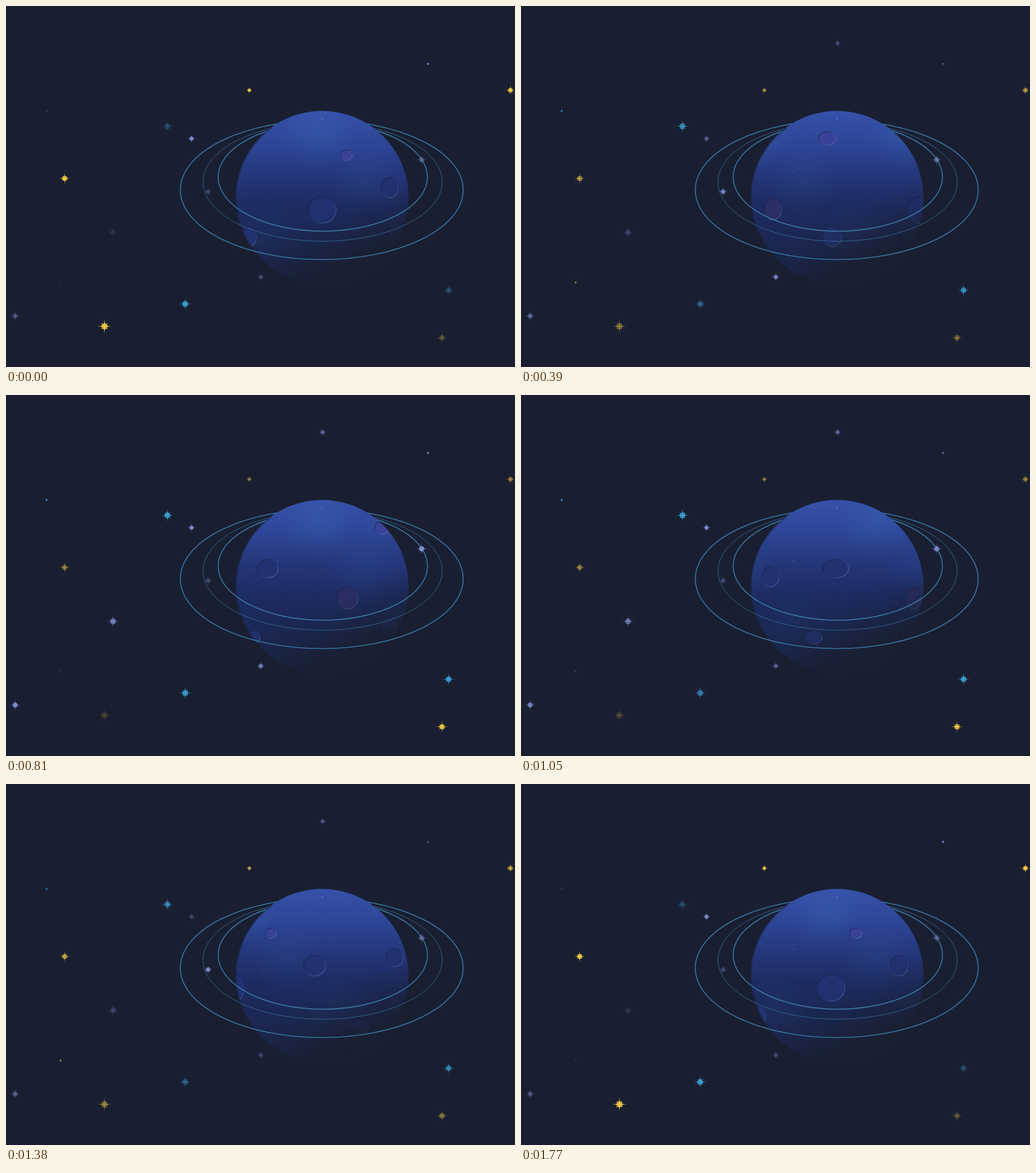
Write an HTML page with a canvas that moves like this. It is 889x630 px and loops after 1.8 s.

```html
<!DOCTYPE html>
<html lang="en">
<head>
<meta charset="utf-8">
<title>Ringed planet</title>
<style>
html, body { margin: 0; width: 100%; height: 100%; overflow: hidden; background: #191f31; }
canvas { display: block; }
</style>
</head>
<body>
<canvas id="stage" width="889" height="630"></canvas>
<script>
const c = document.getElementById('stage').getContext('2d');
const LOOP = 1800, STEP = 30, TAU = Math.PI * 2;
const SKY = '#191f31';
const planet = { x: 552, y: 334, r: 151 };
const YELLOW = '#f6ce44', BLUE = '#3eaae2', VIOLET = '#8493d6';
const NAVY = '#213171', PURPLE = '#3a4297', PLUM = '#2a2e65';

// A pulse rests at one brightness and swings to another around its peak time
const pulse = (peak, rest, top, count = 1) => t => {
  const swing = (1 + Math.cos(TAU * count * (t - peak) / LOOP)) / 2;
  return rest + (top - rest) * swing ** 2;
};
const warm = pulse(1745, .44, .96);
const cool = pulse(1755, .86, .23);
const swell = pulse(840, .38, .97);
const flip = pulse(860, .38, .84, 2);

const stars = [
  [553, 65, 8, VIOLET, pulse(20, .5, 0)],
  [737, 101, 4, VIOLET, flip],
  [425, 147, 6.5, YELLOW, warm],
  [881, 147, 9, YELLOW, warm],
  [71, 183, 3.5, BLUE, cool],
  [282, 210, 11.5, BLUE, cool],
  [324, 231.5, 8, VIOLET, pulse(510, .92, .25, 2)],
  [726, 268.5, 10, VIOLET, swell],
  [102.5, 301, 10, YELLOW, warm],
  [353, 324, 9, VIOLET, pulse(480, .27, .9, 2)],
  [187, 395, 11, VIOLET, pulse(890, .12, .77)],
  [445, 473, 8.5, VIOLET, pulse(610, .25, .9)],
  [95.5, 482.5, 3, YELLOW, pulse(430, .12, .7, 2)],
  [773, 496, 11, BLUE, cool],
  [313, 520, 11.5, BLUE, flip],
  [16, 541, 9.5, VIOLET, swell],
  [172, 559, 12.5, YELLOW, pulse(1770, .14, .92)],
  [761.5, 579, 10.5, YELLOW, pulse(910, .23, .95)]
];

// mid: time at the middle of the planet; speed in pixels per ms
const craters = [
  { mid: 1665, speed: .313, y: 260.5, w: 22, h: 18, fill: PURPLE },
  { mid: 1422, speed: .312, y: 317, w: 39, h: 36, fill: NAVY },
  { mid: 1798, speed: .36, y: 356, w: 48, h: 46, fill: NAVY },
  { mid: 418, speed: .303, y: 402.5, w: 33, h: 35, fill: NAVY },
  { mid: 450, speed: .291, y: 231, w: 31, h: 24, fill: PURPLE },
  { mid: 690, speed: .373, y: 354.5, w: 38, h: 38, fill: PLUM },
  { mid: 1055, speed: .389, y: 303, w: 44, h: 32, fill: NAVY },
  { mid: 1175, speed: .328, y: 423, w: 31, h: 23, fill: NAVY }
];

// x, y, rx, ry, line width
const rings = [
  [551.5, 321, 247, 121.5, 1.6],
  [553, 307, 209, 103.5, .8],
  [553.3, 298.5, 182.8, 94.5, 1.6]
];

function gradient(box, stops) {
  const g = box.length > 4 ? c.createRadialGradient(...box) : c.createLinearGradient(...box);
  for (const [at, colour] of stops) g.addColorStop(at, colour);
  return g;
}

function seeded(seed) {
  return () => (seed = seed * 16807 % 2147483647) / 2147483647;
}

const body = gradient([0, 183, 0, 485], [
  [0, '#3651a9'], [.2, '#2d4596'], [.4, '#233476'], [.55, '#1d2b61'], [.7, '#1b2856'], [1, '#1a254b']
]);
// Night side, falling toward the lower right
const shade = gradient([491, 388, 536, 492], [
  [0, '#191f3100'], [.35, '#191f3138'], [.6, '#191f3190'], [.85, '#191f31ea'], [1, SKY]
]);

// Offsets from mid planet, for this pass and the ones before and after
const passes = (t, mid, speed) => [-LOOP, 0, LOOP].map(shift => (t + shift - mid) * speed);

function drawRings(from) {
  c.strokeStyle = '#3b77a4';
  for (const [x, y, rx, ry, width] of rings) {
    c.lineWidth = width;
    c.beginPath();
    c.ellipse(x, y, rx, ry, 0, from, from + Math.PI);
    c.stroke();
  }
}

function drawPatches(t) {
  const size = 62;
  for (let row = 0; row < 3; row++) {
    const y = 222 + row * 85;
    c.globalAlpha = .16 / (row + 1);
    for (let i = 0; i < 2; i++) {
      for (const offset of passes(t, 25 - row * 260 + i * 810, .32)) {
        const x = planet.x + offset;
        c.fillStyle = gradient([x, y, 0, x, y, size], [[0, '#4186cc'], [.4, '#4186cc99'], [1, '#4186cc00']]);
        c.fillRect(x - size, y - size, 2 * size, 2 * size);
      }
    }
  }
}

function drawSpecks() {
  const random = seeded(41);
  const speck = (x, y, alpha) => {
    c.globalAlpha = alpha;
    c.fillRect(x - .5, y - .5, 1.4, 1.4);
  };
  c.fillStyle = '#b9cdf5';
  speck(552, 197, .7);
  speck(553, 233, .3);
  speck(475, 289, .35);
  speck(623, 338, .4);
  for (let i = 0; i < 9; i++) speck(435 + random() * 190, 270 + random() * 140, .15);
}

function drawCrater({ mid, speed, y, w, h, fill }, t) {
  for (const offset of passes(t, mid, speed)) {
    const edge = offset / planet.r;
    if (Math.abs(edge) > 1.2) continue;
    const x = planet.x + offset;
    const rx = w / 2 * (1 - .4 * edge ** 2), ry = h / 2;
    c.beginPath();
    c.ellipse(x, y, rx, ry, 0, 0, TAU);
    c.fillStyle = fill;
    c.fill();
    c.lineWidth = 1;
    c.strokeStyle = gradient([x - rx * .6, y - ry * .8, x + rx * .6, y + ry * .8],
      [[0, '#141c45'], [.4, '#141c4566'], [.6, '#6f80c022'], [1, '#8492c8a0']]);
    c.stroke();
  }
}

function drawPlanet(t) {
  const { x, y, r } = planet;
  const cover = fill => {
    c.globalAlpha = 1;
    c.fillStyle = fill;
    c.fillRect(x - r, y - r, 2 * r, 2 * r);
  };
  c.save();
  c.beginPath();
  c.arc(x, y, r, 0, TAU);
  c.clip();
  cover(body);
  drawPatches(t);
  drawSpecks();
  c.globalAlpha = 1;
  for (const crater of craters) drawCrater(crater, t);
  cover(shade);
  // Dim left limb
  c.beginPath();
  c.arc(x, y, r, Math.PI * .75, Math.PI * 1.3);
  c.lineWidth = 4;
  c.strokeStyle = '#191f3170';
  c.stroke();
  c.restore();
}

function spikes(x, y, count, outer, inner) {
  c.beginPath();
  for (let i = 0; i < count * 2; i++) {
    const r = i % 2 ? inner : outer, a = i * Math.PI / count;
    c.lineTo(x + r * Math.cos(a), y + r * Math.sin(a));
  }
  c.fill();
}

function drawStar([x, y, size, colour, glow], t) {
  c.fillStyle = colour;
  c.globalAlpha = glow(t) * .8;
  spikes(x, y, 4, size, size * .13);
  c.globalAlpha = glow(t) * .95;
  spikes(x, y, 8, size * .58, size * .37);
  c.globalAlpha = 1;
}

function frame(now) {
  const t = Math.floor(now % LOOP / STEP) * STEP;
  c.fillStyle = SKY;
  c.fillRect(0, 0, 889, 630);
  drawRings(Math.PI);
  drawPlanet(t);
  drawRings(0);
  for (const star of stars) drawStar(star, t);
  requestAnimationFrame(() => frame(performance.now() - start));
}

const start = performance.now();
frame(0);
</script>
</body>
</html>
```
